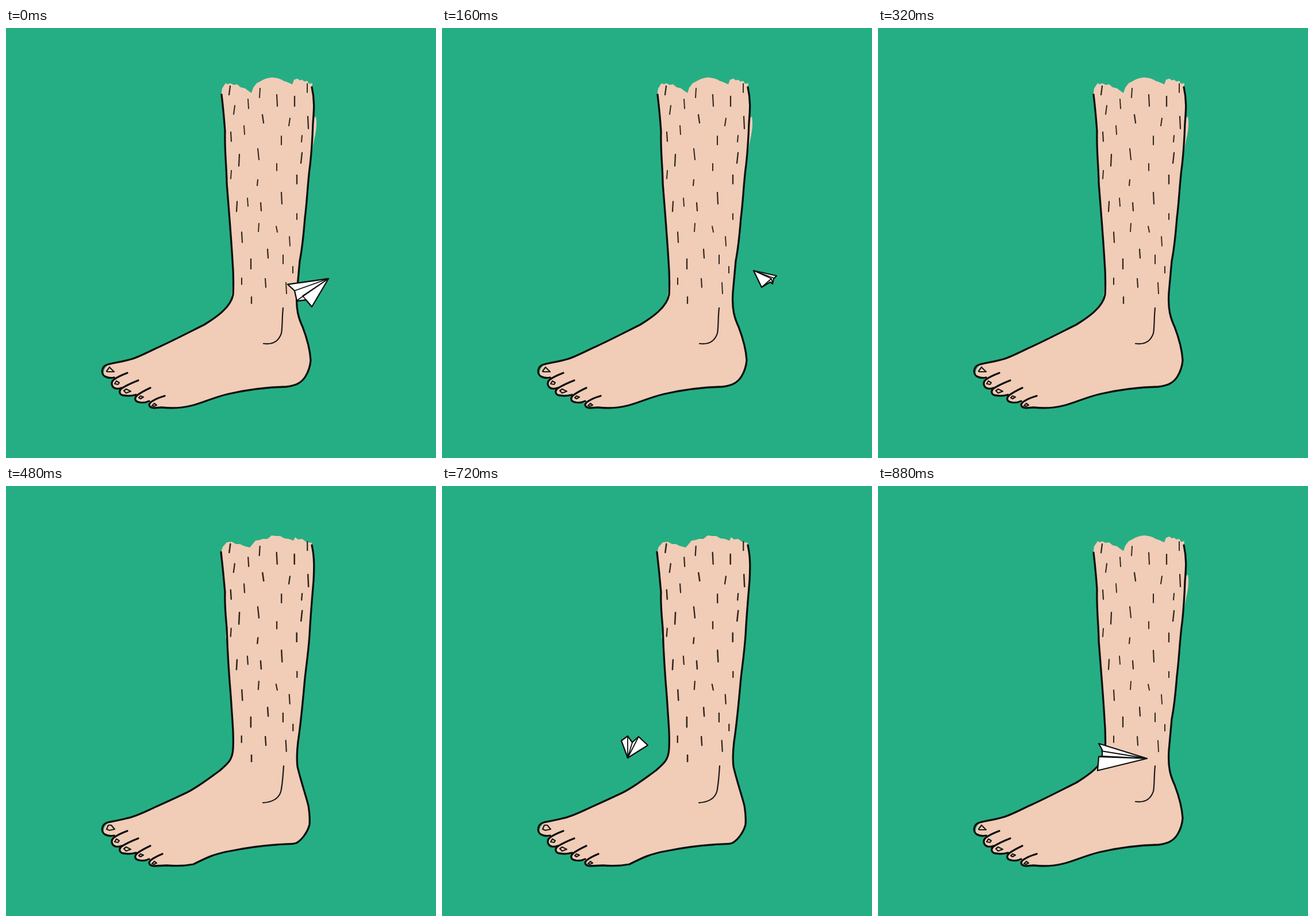
Recreate the animation shown at these times as an HTML page. Size 748x748 px, loop 960 ms.

```html
<!DOCTYPE html>
<html lang="en">
<head>
<meta charset="utf-8">
<title>Paper plane around a leg</title>
<style>
  html, body { margin: 0; width: 100%; height: 100%; overflow: hidden; background: #25ae84; }
  svg { display: block; width: 100vw; height: 100vh; }
  path { stroke-linecap: round; stroke-linejoin: round; }
  .skin { fill: #f1ccb7; }
  .ink { fill: none; stroke: #0d100e; stroke-width: 3.3; }
  .thin { fill: none; stroke: #1c1a18; stroke-width: 2.2; }
  .hair { fill: none; stroke: #30271f; }
  .paper { fill: #fff; stroke: #0d100e; stroke-width: 2.3; }
  .fold { fill: none; stroke: #0d100e; stroke-width: 1.8; }
</style>
</head>
<body>
<svg id="stage" viewBox="0 0 748 748">
  <g id="back"></g>
  <g id="legs"></g>
  <g id="front"></g>
</svg>
<script>
const STEP = 80, STEPS = 12;
const $ = id => document.getElementById(id);

function add(parent, tag, attrs = {}) {
  const el = document.createElementNS('http://www.w3.org/2000/svg', tag);
  for (const k in attrs) el.setAttribute(k, attrs[k]);
  return parent.appendChild(el);
}

// Hairs as "x,y,length", grouped by how far the lower end leans.
const hairs = {
  '-2': '390,101,15 398,135,15 494,157,13 515,217,18',
  '-1': '442,105,16 515,187,11 406,220,20 392,248,14 438,264,10 402,302,17 440,340,14',
  '0': '524,97,15 502,119,17 479,188,15 471,236,12 506,256,15 506,323,10 482,395,15 426,402,17 499,415,11 410,435,11 427,468,11',
  '1': '421,124,16 471,116,20 525,154,21 414,170,15 391,181,16 479,286,20 420,296,14 443,304,14 410,355,18 493,363,16 455,385,15 451,436,15 487,443,19',
  '2': '446,151,14 438,210,19 470,345,10'
};

const toeEdge = 'L257 661Q246 660 250 652L232 651Q222 648 228 639L204 639Q196 635 201 627L190 627Q182 622 187 611L172 606Q166 597 178 585';
const toes = 'M178 585C165 588 165 602 172 606Q179 610 188 608' +
  'M211 600Q195 606 187 612C181 618 185 626 191 627Q196 628 201 626' +
  'M230 613Q212 620 201 627C195 632 198 638 204 639Q215 641 226 638' +
  'M251 626Q236 633 228 639C222 645 225 650 232 651Q240 653 249 649';
const nails = 'M189 619L192 614L197 617L195 620ZM205 631L209 628L217 632L209 635ZM231 643L234 640L239 642L234 645ZM254 657L258 653L262 656L257 658Z';

// Sides run from the top right, round the heel, and back up from the big toe.
const poses = [{
  top: '375 112L376 105L382 96L386 98L390 96L396 99L402 98L408 103L416 105L421 109L427 113L430 104L436 96L442 93Q451 87 463 86Q476 87 483 92L489 94L498 98L501 90L507 88L511 91L515 90L519 93L524 92L527 97L533 96',
  right: '532 103C537 125 536 142 534 165C533 195 531 220 529 238C525 265 524 300 520 330C517 368 514 390 511 405L506 460C504 490 509 505 516 520C524 541 529 560 530 578C529 590 526 598 521 606C514 617 505 622 488 624C450 625 415 630 385 637C360 643 340 653 322 657Q298 663 271 660L257 661',
  left: '178 585C190 582 205 580 218 576C230 573 250 562 268 554C290 544 317 530 345 516C366 503 391 486 395 464C396 445 396 430 394 405C392 370 388 320 384 270C384 245 380 215 381 180Q379 150 375 116',
  extra: 'M534 158L539 154Q542 170 536 195L531 222ZM395 436L392 470L397 458Z',
  toe: 'M276 640Q262 644 253 650C246 655 249 660 257 661',
  nail: 'M175 597L180 590L188 598L176 598Z',
  ankle: 'M482 487C480 505 481 522 479 531C474 546 463 551 448 549',
  hairWidth: 2.1, wobble: 0
}, {
  top: '374 115L377 106L384 98L393 97L400 101L407 101L413 104L424 107L430 100L434 95L441 94L447 92L455 92L462 86L470 87L477 87L484 91L492 92L500 95L503 89L508 93L515 92L522 97L532 99',
  right: '532 103C537 125 536 145 535 165C532 200 529 240 528 260C525 300 521 320 519 345C515 390 511 425 508 445Q505 470 507 488C512 510 522 540 526 556Q529 575 528 589C524 604 513 617 505 621C498 624 487 622 470 624C440 626 410 631 390 635C362 640 350 646 326 658Q305 662 280 660L257 661',
  left: '178 585C188 583 200 581 210 578C222 576 235 570 250 563C265 556 290 545 315 533C335 523 355 507 372 495C387 482 394 476 395 457Q396 435 394 410L391 365C388 330 385 280 384 247C382 225 380 205 381 185Q378 150 374 115',
  extra: 'M384 235L382 262L385 275Z',
  toe: 'M272 640Q260 645 253 650C246 655 249 660 257 661',
  nail: 'M175 597L178 590L183 590L189 597L180 599Z',
  ankle: 'M483 487C482 500 481 520 478 532C474 544 463 550 447 551',
  hairWidth: 2.4, wobble: 0.3
}];

function drawLeg(p) {
  const g = add($('legs'), 'g');
  const path = (cls, d) => add(g, 'path', { class: cls, d });
  path('skin', `M${p.top}L${p.right}${toeEdge}L${p.left}Z${p.extra}`);
  path('ink', `M${p.right}M${p.left}${toes}${p.toe}`);
  path('thin', nails + p.nail + p.ankle);
  let i = 0;
  for (const lean in hairs) {
    for (const hair of hairs[lean].split(' ')) {
      const [x, y, h] = hair.split(',').map(Number);
      const dx = p.wobble * Math.sin(++i * 2.3);
      const dy = p.wobble * Math.cos(i * 1.7);
      path('hair', `M${x + dx} ${y + dy}l${lean} ${h}`)
        .setAttribute('stroke-width', p.hairWidth + 0.2 * Math.sin(i * 4.1));
    }
  }
  return g;
}

// Plane shapes: outline and folds.
const leaving = ['M542 422L582 431L577 436L575 445L571 442L556 451Z', 'M542 422L577 435M542 422L573 436L556 451M573 436L575 445'];
const arriving = ['M326 440L353 417L366 418L365 427L372 425L380 440Z', 'M326 440L365 419M326 440L365 427M326 440L372 425'];

const flight = {
  0: { shape: ['M561 436L490 446L502 457L506 475L522 473L532 485Z', 'M502 457L561 436L506 474M561 436L516 466L532 485M516 466L522 473'] },
  1: { shape: ['M579 420L529 424L537 434L541 449L552 446L563 460Z', 'M537 434L579 420L541 449M579 420L550 441L563 460'] },
  2: { shape: leaving, behind: true },
  3: { shape: leaving, behind: true, move: 'translate(22 38) scale(.9)' },
  7: { shape: arriving, behind: true, move: 'translate(68 40) scale(.9)' },
  8: { shape: arriving, behind: true },
  9: { shape: ['M323 473L312 443L323 435L331 446L342 436L358 451Z', 'M323 473L323 435M323 473L331 446M323 473L342 436'] },
  10: { shape: ['M405 472L346 433L343 440L345 458L331 457L316 482Z', 'M405 472L343 445M405 472L345 458M405 472L331 457'] },
  11: { shape: ['M468 474L384 448L390 459L390 470L384 471L382 495Z', 'M468 474L389 461M468 474L390 470M468 474L384 471'] }
};

const legs = poses.map(drawLeg);
const planes = {};
for (const step in flight) {
  const { shape, behind, move = '' } = flight[step];
  const g = planes[step] = add($(behind ? 'back' : 'front'), 'g', { transform: move });
  add(g, 'path', { class: 'paper', d: shape[0] });
  add(g, 'path', { class: 'fold', d: shape[1] });
}

const show = (el, on) => el.style.display = on ? '' : 'none';

function render(time) {
  const step = Math.floor(time / STEP) % STEPS;
  const pose = step >= 5 && step <= 10 ? 1 : 0;
  legs.forEach((leg, i) => show(leg, i === pose));
  for (const s in planes) show(planes[s], +s === step);
}

const start = performance.now();
function tick() {
  render(performance.now() - start);
  requestAnimationFrame(tick);
}
tick();
</script>
</body>
</html>
```
